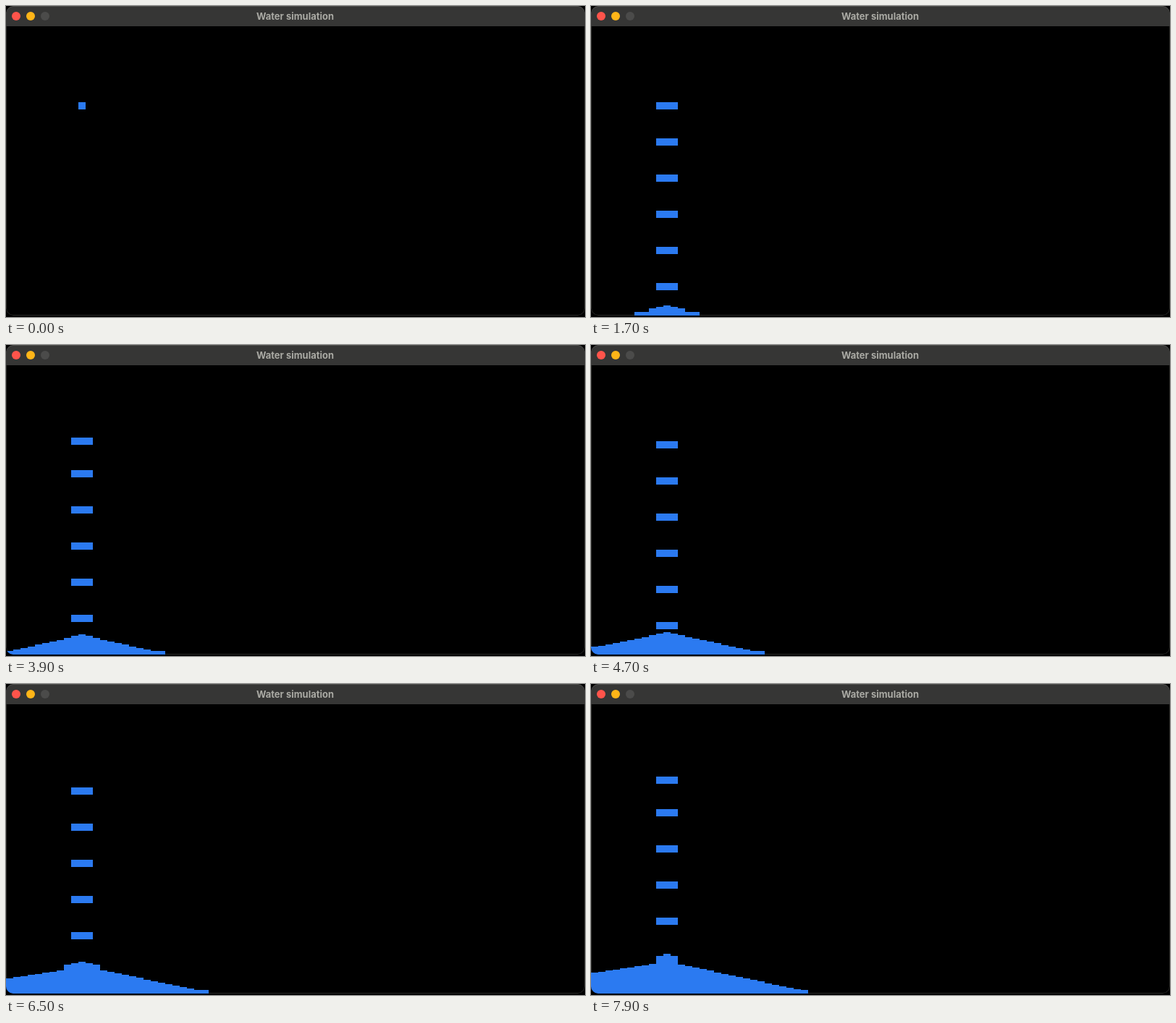
An HTML page with a canvas that plays this animation: 800 px wide and 430 px high, repeating every 8000 ms.

```html
<!DOCTYPE html>
<html lang="en">
<head>
<meta charset="utf-8">
<title>Water simulation</title>
<style>
  html, body { margin: 0; width: 100%; height: 100%; overflow: hidden; background: #000; }
  .window {
    position: absolute; left: 0; top: 0; width: 800px; height: 428px;
    border-radius: 10px; overflow: hidden; background: #000;
  }
  .window::before {
    content: ""; position: absolute; inset: 0; border-radius: 10px;
    border: 1px solid #2a2a28; box-sizing: border-box;
  }
  .bar {
    position: absolute; left: 0; top: 0; width: 800px; height: 28px;
    border-radius: 10px 10px 0 0; background: #363635; box-shadow: inset 0 1px #50504e;
  }
  .bar i { position: absolute; top: 8px; width: 12px; height: 12px; border-radius: 50%; }
  .close { left: 8px; background: #ff544b; }
  .mini { left: 28px; background: #ffb518; }
  .zoom { left: 48px; background: #4b4b4a; }
  .title {
    position: absolute; left: 0; top: 0; width: 799px; text-align: center;
    font: 700 13px/28px Inter, "Open Sans", sans-serif; color: #aaaaa4;
  }
  canvas { position: absolute; left: 0; top: 0; }
</style>
</head>
<body>
<div class="window">
  <canvas width="800" height="428"></canvas>
  <div class="bar">
    <i class="close"></i><i class="mini"></i><i class="zoom"></i>
    <div class="title">Water simulation</div>
  </div>
</div>
<script>
const ctx = document.querySelector("canvas").getContext("2d");
const LOOP = 8000, FRAME = 100;
const CELL = 10, COLUMNS = 80, FLOOR = 428, SPOUT = 10;
const SLOPE = 2.15, REFLECTION = 0.3, MIN_DEPTH = 5;

const stepAt = t => 2 * Math.floor(t / FRAME);
const dropTop = age => age === 0 ? 128 : 123 + CELL * age;

// A triple drop leaves the spout every five steps.
function dropsAt(t) {
  const tops = [];
  for (let age = stepAt(t) - 3; age >= 0; age -= 5) tops.push(dropTop(age));
  return tops;
}

// Columns the pool has spread to either side: a quick splash, then a slowing creep.
function reachAt(t) {
  const splash = 15 * Math.max(0, t / 1000 - 1.4);
  const creep = 5.98 * Math.max(0, t / 1000 - 1.1) ** 0.624;
  return Math.min(splash, creep);
}

// A heap with straight sides, partly thrown back by the left wall.
function calmDepth(column, t) {
  const reach = reachAt(t);
  const slope = c => SLOPE * Math.max(0, reach - Math.abs(c - SPOUT));
  const own = slope(column);
  return own > 0 ? 2 + own + REFLECTION * slope(-1 - column) : 0;
}

// Steps since a drop touched the pool; negative while it falls.
function stepsInPool(top, t) {
  const surface = FLOOR - calmDepth(SPOUT, t);
  return Math.floor((top + CELL - surface + 3) / CELL);
}

// The newest landed drop lifts the middle, widens and sinks away.
function swell(column, t) {
  const landed = dropsAt(t).map(top => stepsInPool(top, t)).filter(n => n >= 0);
  const n = Math.min(...landed);
  const width = n === 0 ? 1 : 2;
  return Math.abs(column - SPOUT) <= width ? CELL / 2 ** n : 0;
}

function fill(column, y, columns, h) {
  ctx.fillRect(column * CELL, y, columns * CELL, h);
}

function draw(t) {
  ctx.clearRect(0, 0, 800, FLOOR);
  ctx.fillStyle = "#2b7af1";

  const first = dropTop(stepAt(t) + 1);
  if (first + CELL <= FLOOR) fill(SPOUT, first, 1, CELL);
  for (const top of dropsAt(t)) {
    if (stepsInPool(top, t) < 0) fill(SPOUT - 1, top, 3, CELL);
  }

  for (let c = 0; c < COLUMNS; c++) {
    const calm = calmDepth(c, t);
    if (calm === 0) continue;
    const depth = Math.max(MIN_DEPTH, Math.round(calm + swell(c, t)));
    fill(c, FLOOR - depth, 1, depth);
  }
}

const start = performance.now();
function tick() {
  const t = (performance.now() - start) % LOOP;
  draw(Math.floor(t / FRAME) * FRAME);
  requestAnimationFrame(tick);
}
tick();
</script>
</body>
</html>
```
